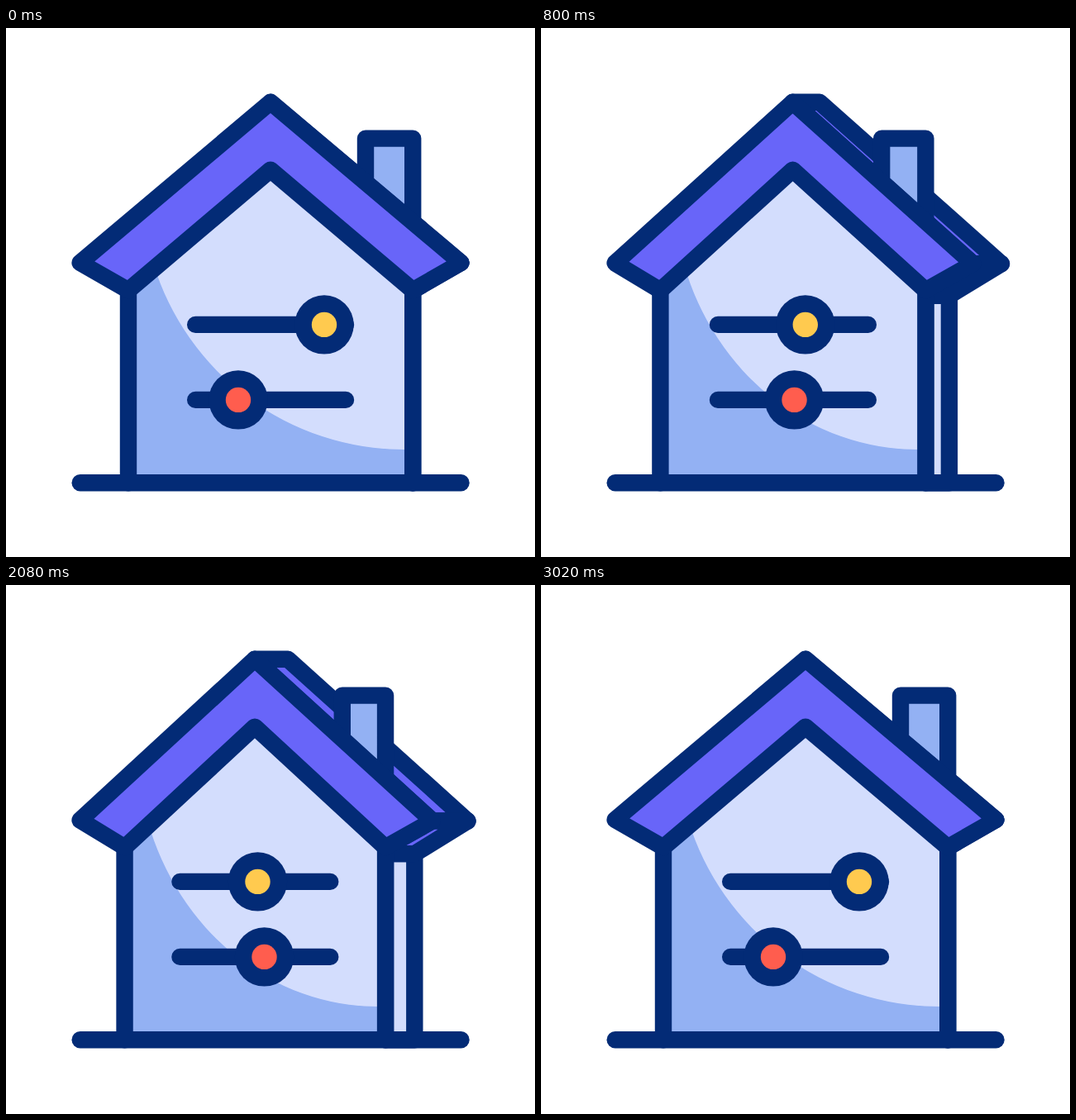
An HTML page for the animation above (3.6 s loop, 640 px wide and 640 px high).

```html
<!DOCTYPE html>
<html lang="en">
<head>
<meta charset="utf-8">
<title>House with sliders</title>
<style>
  html, body { margin: 0; width: 100%; height: 100%; overflow: hidden; background: #fff; }
  svg { display: block; width: 100vw; height: 100vh; }
  .line { stroke: #032b76; stroke-width: 20.4; stroke-linecap: round; stroke-linejoin: round; }
  .none { fill: none; }
  .wall { fill: #d3ddfd; }
  .shade { fill: #93b1f3; }
  .roof { fill: #6865f9; }
  .dark { fill: #032b76; }
</style>
</head>
<body>
<svg viewBox="0 0 640 640">
  <path id="side" class="line wall"/>
  <path id="backRoof" class="line roof"/>
  <path id="eave" class="line roof"/>
  <path id="chimney" class="line shade"/>
  <path id="front" class="wall"/>
  <path id="shadow" class="shade"/>
  <path id="posts" class="line none"/>
  <path id="frontRoof" class="line roof"/>
  <path class="line none" d="M89.7 550.3H550.5"/>
  <path id="tracks" class="line none"/>
  <g id="topKnob"><circle class="dark" r="35.7"/><circle r="15.2" fill="#ffca4f"/></g>
  <g id="lowKnob"><circle class="dark" r="35.7"/><circle r="15.2" fill="#ff5d4e"/></g>
</svg>
<script>
const LOOP = 3600, TURN = 1495;
const GROUND = 550.3, EAVE = 317.4, RADIUS = 317.4;
const part = {};
document.querySelectorAll('[id]').forEach(el => part[el.id] = el);

const draw = (name, d) => part[name].setAttribute('d', d);
const poly = (name, points) => draw(name, 'M' + points.map(p => p.join(' ')).join('L') + 'Z');
const place = (name, x, y) => part[name].setAttribute('transform', `translate(${x} ${y})`);

// Cubic bezier ease (.5, 0, .5, 1), solved by bisection.
function ease(x) {
  let low = 0, high = 1;
  for (let i = 0; i < 30; i++) {
    const s = (low + high) / 2;
    if (1.5 * s * (1 - s) + s ** 3 < x) low = s; else high = s;
  }
  return low * low * (3 - 2 * low);
}

// turn: 0 is the flat front view, 1 is fully rotated.
function render(turn) {
  const mix = (start, shift) => start + shift * turn;
  const left = mix(148, -6.3), right = mix(492.2, -47);
  const backRight = mix(492.2, 3), backEave = mix(EAVE, 11);
  const squeeze = (right - left) / 344.2;
  const across = x => left + (x - 148) * squeeze;

  const apex = [mix(320, -27), 89.8];
  const innerApex = [apex[0], 171.6];
  const leftTip = [89.6, mix(284, .7)];
  const rightTip = [mix(550.4, -49), mix(284, 2)];
  const backApex = [mix(320, 30), 89.8];
  const backTip = [mix(550.4, 11.5), mix(284, 2.2)];
  const leftEave = [left, EAVE], rightEave = [right, EAVE];

  const slope = (rightTip[1] - apex[1]) / (rightTip[0] - apex[0]);
  const onRoof = x => [x, apex[1] + (x - apex[0]) * slope];

  poly('side', [[right, backEave], [backRight, backEave], [backRight, GROUND], [right, GROUND]]);
  poly('backRoof', [apex, backApex, backTip, rightTip]);
  poly('eave', [rightTip, rightEave, [right, backEave], [backRight, backEave], backTip]);

  const chimneyLeft = mix(435, -40);
  poly('chimney', [[chimneyLeft, 133.6], [right, 133.6], onRoof(right), onRoof(chimneyLeft)]);

  poly('front', [[left, GROUND], leftEave, innerApex, rightEave, [right, GROUND]]);
  draw('shadow', `M${left} ${EAVE}L${across(178.3)} 285` +
    `A${RADIUS * squeeze} ${RADIUS} 0 0 0 ${across(482)} 510H${right}V${GROUND}H${left}Z`);
  draw('posts', `M${left} ${EAVE}V${GROUND}M${right} ${EAVE}V${GROUND}`);
  poly('frontRoof', [apex, rightTip, rightEave, innerApex, leftEave, leftTip]);

  const track = mix(229.2, -26.6);
  draw('tracks', `M${track} 358.9h181.8M${track} 449.9h181.8`);
  place('topKnob', mix(385, -114.2), 358.9);
  place('lowKnob', mix(281, 44.7), 449.9);
}

const started = performance.now();
function tick() {
  const t = (performance.now() - started) % LOOP;
  render(ease(Math.max(0, 1 - Math.abs(t / TURN - 1))));
  requestAnimationFrame(tick);
}
tick();
</script>
</body>
</html>
```
